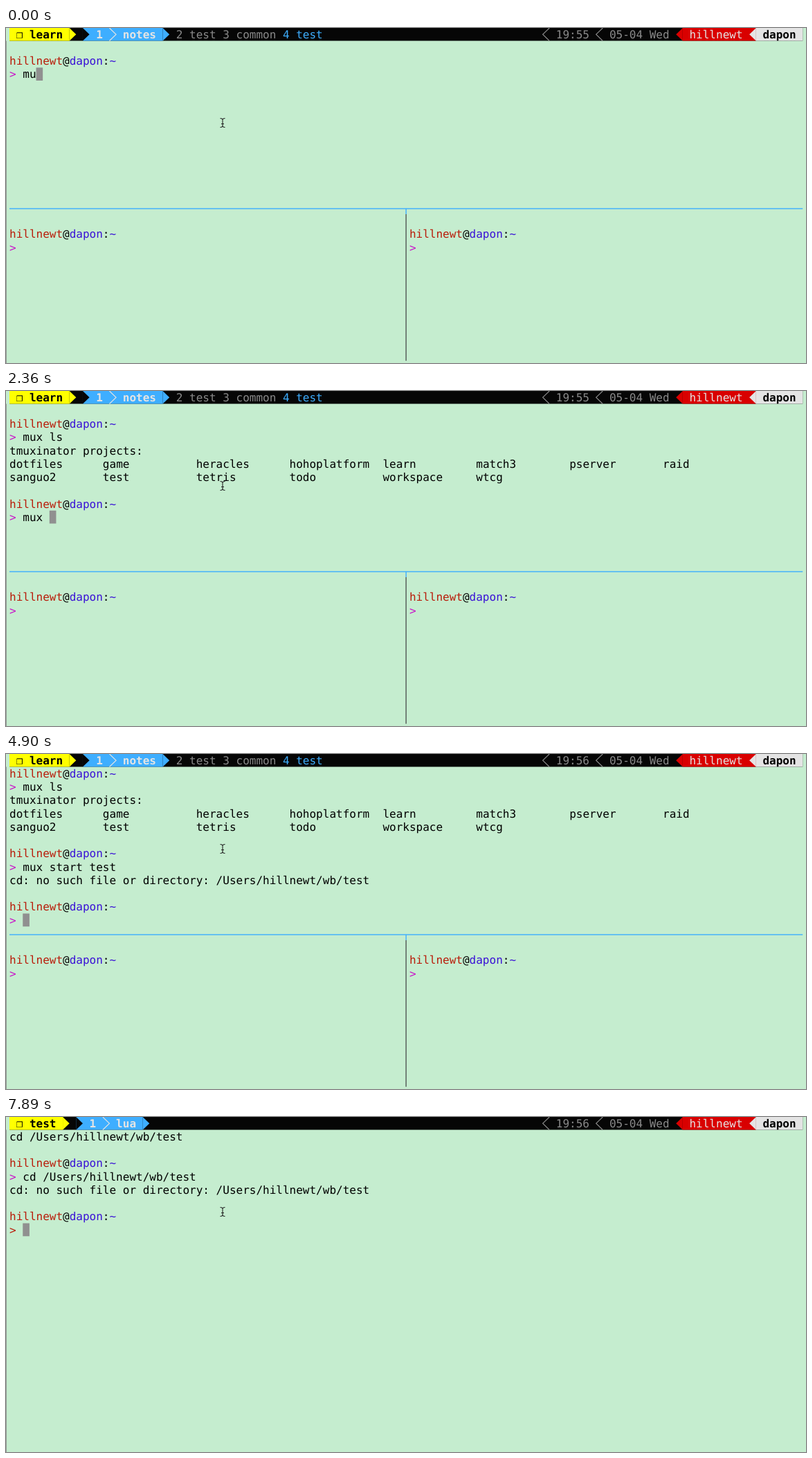
These frames come from a looping animation (1156 by 484 pixels, 8 s). An HTML page with a canvas:

```html
<!DOCTYPE html>
<html lang="en">
<head>
<meta charset="utf-8">
<title>Terminal sessions</title>
<style>
  html, body { margin: 0; width: 100%; height: 100%; overflow: hidden; background: #c5edcf; }
  canvas { display: block; width: 1156px; height: 484px; }
</style>
</head>
<body>
<canvas id="stage"></canvas>
<script>
const WIDTH = 1156, HEIGHT = 484, LOOP = 8000;
const COL = 9.632, ROW = 19.25, LEFT = 5, BAR = 18.5;
const PANE_ROWS = 12;
const USER = 'hillnewt', HOST = 'dapon';
const FONT = '16px "DejaVu Sans Mono", monospace';
const C = {
  paper: '#c5edcf', ink: '#000', bar: '#060606', yellow: '#ffff00', blue: '#3eaeff',
  pale: '#e4e4e4', dim: '#8a8a8a', red: '#d90000', user: '#b91c0a', host: '#3a12d6',
  magenta: '#c814c8', cursor: '#909090', divider: '#5f6963'
};

const canvas = document.getElementById('stage');
const ctx = canvas.getContext('2d');
const scale = window.devicePixelRatio || 1;
canvas.width = WIDTH * scale;
canvas.height = HEIGHT * scale;
ctx.scale(scale, scale);
ctx.textRendering = 'geometricPrecision';

const x = col => LEFT + col * COL;
const y = row => row * ROW - 0.5;

function rect(left, top, width, height, color) {
  ctx.fillStyle = color;
  ctx.fillRect(left, top, width, height);
}

function text(str, col, row, color = C.ink, bold = false) {
  ctx.font = (bold ? 'bold ' : '') + FONT;
  ctx.fillStyle = color;
  ctx.fillText(str, x(col), y(row) + 15);
}

// Status bar pieces

function segment(from, to, color) {
  rect(x(from), 0, x(to) - x(from), BAR, color);
}

function chevronPath(col, pointsLeft) {
  const base = x(pointsLeft ? col + 1 : col), tip = x(pointsLeft ? col : col + 1);
  ctx.beginPath();
  ctx.moveTo(base, 0);
  ctx.lineTo(tip, BAR / 2);
  ctx.lineTo(base, BAR);
}

function arrow(col, color, pointsLeft = false) {
  chevronPath(col, pointsLeft);
  ctx.fillStyle = color;
  ctx.fill();
}

function chevron(col, color, pointsLeft = false) {
  chevronPath(col, pointsLeft);
  ctx.strokeStyle = color;
  ctx.lineWidth = 1.1;
  ctx.stroke();
}

function statusBar(session, windowName, clock) {
  segment(0, 119, C.bar);

  let col = session.length + 4;
  segment(0, col, C.yellow);
  arrow(col, C.yellow);
  text('❐', 1, 0, C.ink, true);
  text(session, 3, 0, C.ink, true);

  col += 2;
  const end = col + 7 + windowName.length;
  segment(col, end, C.blue);
  arrow(col, C.bar);
  arrow(end, C.blue);
  text('1', col + 2, 0, C.pale, true);
  chevron(col + 4, C.pale);
  text(windowName, col + 6, 0, C.pale, true);

  chevron(80, C.dim, true);
  text(clock, 82, 0, C.dim);
  chevron(88, C.dim, true);
  text('05-04 Wed', 90, 0, C.dim);
  arrow(100, C.red, true);
  segment(101, 112, C.red);
  text(USER, 102, 0, C.pale);
  arrow(111, C.pale, true);
  segment(112, 119, C.pale);
  text(HOST, 113, 0, C.ink, true);
}

// Terminal lines: a plain string, or a list of [string, color] spans

const prompt = (command = '', color = C.magenta) => [
  [[USER, C.user], ['@', C.ink], [HOST, C.host], [':', C.ink], ['~', C.host]],
  [['> ', color], [command, C.ink]]
];
const spans = line => typeof line === 'string' ? [[line, C.ink]] : line;
const columns = names => names.map(name => name.padEnd(14)).join('').trimEnd();

function drawLines(lines, row, col = 0) {
  lines.forEach((line, i) => {
    let at = col;
    for (const [str, color] of spans(line)) {
      text(str, at, row + i, color);
      at += str.length;
    }
  });
}

function drawTerminal(lines) {
  const visible = lines.slice(-PANE_ROWS);
  const length = spans(visible.at(-1)).reduce((sum, [str]) => sum + str.length, 0);
  rect(x(length), y(visible.length), COL, ROW - 0.5, C.cursor);
  drawLines(visible, 1);
}

const typed = (str, keyTimes, t) => str.slice(0, keyTimes.filter(k => k <= t).length);

const LIST_KEYS = [0, 0, 60, 270, 600, 840];
const START_KEYS = [1940, 2120, 2180, 2360, 2600, 2700, 2810, 2910, 3020, 3120,
                    3450, 3560, 3660, 3770];
const PROJECT = `/Users/${USER}/wb/test`;
const MISSING = `cd: no such file or directory: ${PROJECT}`;
const PROJECTS = [
  'tmuxinator projects:',
  columns(['dotfiles', 'game', 'heracles', 'hohoplatform', 'learn', 'match3', 'pserver', 'raid']),
  columns(['sanguo2', 'test', 'tetris', 'todo', 'workspace', 'wtcg'])
];

function learnLines(t) {
  const lines = ['', ...prompt(typed('mux ls', LIST_KEYS, t))];
  if (t >= 1110 && t < 1380) lines.push('');
  if (t >= 1380) lines.push(...PROJECTS, '');
  if (t >= 1460) lines.push(...prompt(typed('mux start test', START_KEYS, t)));
  if (t >= 4330 && t < 4780) lines.push('');
  if (t >= 4780) lines.push(MISSING, '');
  if (t >= 4900) lines.push(...prompt());
  return lines;
}

function testLines(t) {
  const command = `cd ${PROJECT}`;
  return t < 7090
    ? [command, '']
    : [command, '', ...prompt(command), MISSING, '', ...prompt('', C.user)];
}

function paneBorders() {
  const middle = x(59.5);
  rect(LEFT, 260.3, x(119) - LEFT, 1.4, C.blue);
  rect(middle - 0.7, 261, 1.4, y(14) - 261, C.blue);
  rect(middle - 0.8, y(14), 1.6, y(25) - y(14), C.divider);
}

function pointer() {
  ctx.strokeStyle = '#222';
  ctx.lineWidth = 1.1;
  ctx.stroke(new Path2D(
    'M309.5 130.5Q313 130.5 313 133Q313 130.5 316.5 130.5' +
    'M313 132.5V141.5M311 138.5H315' +
    'M309.5 143.5Q313 143.5 313 141Q313 143.5 316.5 143.5'));
}

function learnSession(t) {
  statusBar('learn', 'notes', t < 2910 ? '19:55' : '19:56');
  text('2 test 3 common', 25, 0, C.dim);
  text('4 test', 41, 0, C.blue);
  paneBorders();
  drawLines(prompt(), 15);
  drawLines(prompt(), 15, 60);
  drawTerminal(learnLines(t));
}

function testSession(t) {
  statusBar('test', 'lua', '19:56');
  drawTerminal(testLines(t));
}

function draw(t) {
  rect(0, 0, WIDTH, HEIGHT, C.paper);
  rect(0, BAR, 1, HEIGHT, '#929b95');
  (t < 5080 ? learnSession : testSession)(t);
  if (t < 7680 || t >= 7890) pointer();
}

const start = performance.now();
function frame() {
  draw((performance.now() - start) % LOOP);
  requestAnimationFrame(frame);
}
frame();
</script>
</body>
</html>
```
